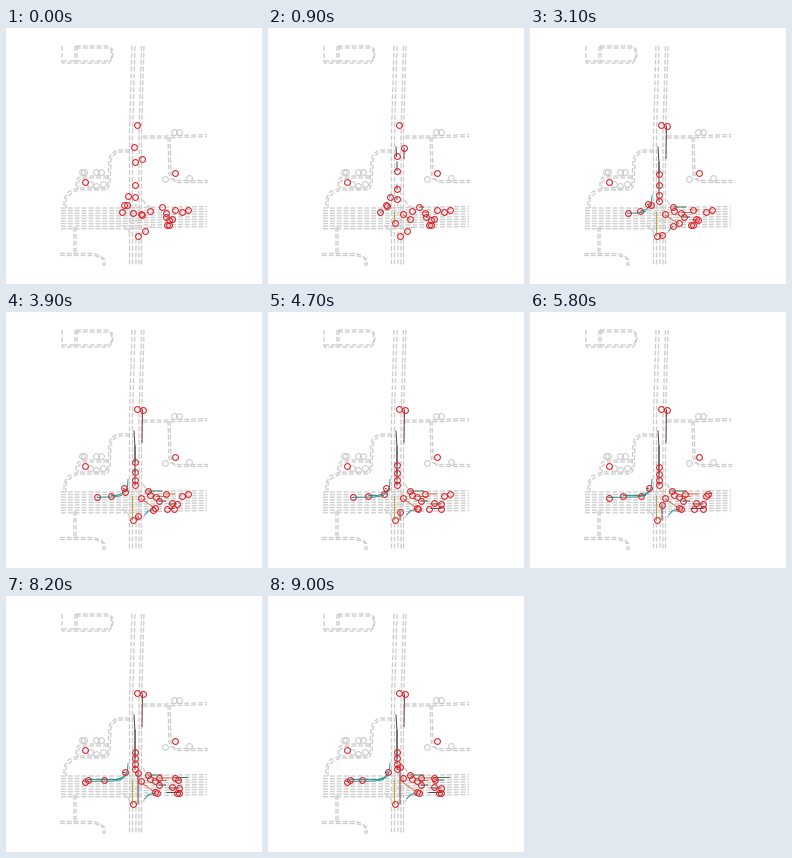
A matplotlib script that plays this animation: 256 px wide and 256 px high, repeating every 9100 ms.

```python
import numpy as np
import matplotlib.pyplot as plt
from matplotlib.animation import FuncAnimation

SIZE, FRAMES, STEP = 256, 91, 100
RED, GRAY = "#e0242a", "#cccccc"
NAVY, TEAL, OLIVE, RUST = "#44484f", "#2b9a9c", "#c2a43c", "#e0704a"
PLUM, GREEN = "#6e4448", "#3a7a5c"

plt.rcParams["path.snap"] = False
fig = plt.figure(figsize=(SIZE / 72, SIZE / 72), dpi=72, facecolor="white")
ax = fig.add_axes([0, 0, 1, 1])
ax.set(xlim=(0, SIZE), ylim=(SIZE, 0))
ax.axis("off")
clock = np.arange(FRAMES)


def road(*pts):
    ax.plot(*zip(*pts), "--", color=GRAY, lw=1.3, zorder=1)


def ring(x, y, color, z):
    return ax.plot([x], [y], "o", ms=5.8, mfc="none", mec=color, mew=1.1, zorder=z)[0]


def cruise(u):
    return u


def brake(u):
    return 1 - (1 - u) ** 2


def launch(u):
    return u ** 1.3


cars = []


def car(*pts, start=0, stop=90, ease=cruise, color=NAVY):
    """Drive along the polyline between two ticks."""
    x, y = np.array(pts, float).T
    dist = np.append(0, np.cumsum(np.hypot(np.diff(x), np.diff(y))))
    s = ease(np.clip((clock - start) / (stop - start), 0, 1)) * dist[-1]
    trail = ax.plot([], [], color=color, lw=1, zorder=3)[0]
    cars.append((np.interp(s, dist, x), np.interp(s, dist, y), trail, ring(0, 0, RED, 4)))


# side streets, each with two edges
for o in (0, 2):
    road((69 + o, 18), (69 + o, 34))
    road((70, 18 + o), (102, 18 + o), (106 - o / 2, 21 + o / 2), (107 - o / 2, 26),
         (106 - o / 2, 31), (103, 35 - o), (56, 35 - o))
    road((124, 122 + o), (111, 122 + o), (105 + o, 126 + o), (103 + o, 132),
         (102 + o, 156), (99 + o, 160 + o), (72, 160 + o), (62 + o, 164 + o),
         (58 + o, 171), (58 + o, 180))
    road((102, 148 + o), (78, 148 + o), (72 + o, 150 + o), (70 + o, 155), (70 + o, 161))
    road((137, 108 + o), (160, 108 + o), (201, 106.5 + o))
    road((162 + o, 109), (163 + o, 146), (165 + o, 151), (170, 152.5 + o), (202, 152.5 + o))
    road((68 + o, 199), (68 + o, 227))
    road((54, 225.5 + o), (88, 225.5 + o), (95 + o, 228 + o), (97 + o, 232), (97 + o, 238))
road((56, 18), (56, 35))

# main roads
for top in (126, 129, 135.5, 138):
    road((top, 18), (top - 2.5, 105), (top - 2.5, 238))
road((130, 176), (130, 238))
for k in range(9):
    west, east = 180 + 2.6 * k, 178.5 + 2.5 * k
    road((55, west), (124, west), (137, east + 1), (201, east))
for west, east in ((175, 172), (205, 206)):
    bend = 1 if west < 190 else -1
    road((124, west), (121, west + 5 * bend), (115, west + 8 * bend))
    road((137, east), (140, east + 5 * bend), (146, east + 8 * bend))

for x, y in ((76, 144), (78, 144), (90, 144), (95, 144), (83.5, 155.5), (90, 157.5),
             (97, 156), (168, 104), (172.5, 104), (158.5, 151), (183, 150)):
    ring(x, y, GRAY, 2)

# standing cars
for spot in ((130.5, 96.5), (168.5, 144.5), (79, 153.5), (144, 182.5), (165.5, 190.5)):
    car(spot, spot)

# north arm: a queue closes up at the stop line, one car leaves
for k, y in enumerate((119, 134, 157, 169)):
    car((128 if k == 0 else 129, y), (129, max(y, 135)), (129, 156 + 5.8 * k),
        stop=66 - 13 * k, ease=brake)
car((136, 130.5), (136.5, 98), stop=28, color=PLUM)

# west arm
car((122, 167.5), (121.5, 174), (120, 179), (116, 182.5), (112, 183.5), (94, 183.5),
    ease=launch, color=TEAL)
car((121, 176.5), (116, 181.5), (110, 183.5), (82, 183.5), stop=74, ease=launch, color=TEAL)
car((115.5, 183.5), (107, 185), (78.5, 185.5), stop=54, ease=launch, color=TEAL)
car((117.5, 176.5), (119.5, 176), start=20)

# south arm and the crossing
car((126.5, 184.5), (126.5, 208), stop=35, ease=brake, color=OLIVE)
car((132, 208), (132, 170.5), start=27, ease=launch, color=PLUM)
car((135, 186), (135, 182), start=78, ease=launch, color=RUST)
car((135.5, 187), (146.5, 194.5), (149, 195.5), stop=32, ease=brake, color=RUST)
car((139, 202.5), (142.5, 198.5), (150.5, 197), start=18, stop=48, color=TEAL)

# east arm
car((156, 179), (142, 179), stop=46, ease=brake, color=GREEN)
car((160, 184.5), (149, 184.5), stop=56, ease=brake, color=RUST)
car((159.5, 189), (153, 189), stop=35)
car((168.5, 182), (153, 182), start=18, stop=80, ease=brake, color=RUST)
car((175.5, 184), (167, 184), start=73, ease=launch, color=GREEN)
car((181.5, 181.5), (166, 181.5), start=50, color=GREEN)
car((163, 192), (173, 192), start=18, stop=46, color=PLUM)
car((163, 196.5), (173, 196.5), start=31, stop=47)
car((161, 196.5), (171, 196.5), start=50, stop=72, ease=launch)


def draw(i):
    for x, y, trail, mark in cars:
        trail.set_data(x[:i + 1], y[:i + 1])
        mark.set_data([x[i]], [y[i]])


anim = FuncAnimation(fig, draw, frames=FRAMES, interval=STEP, repeat=True,
                     repeat_delay=0, cache_frame_data=False)
plt.show()
```
